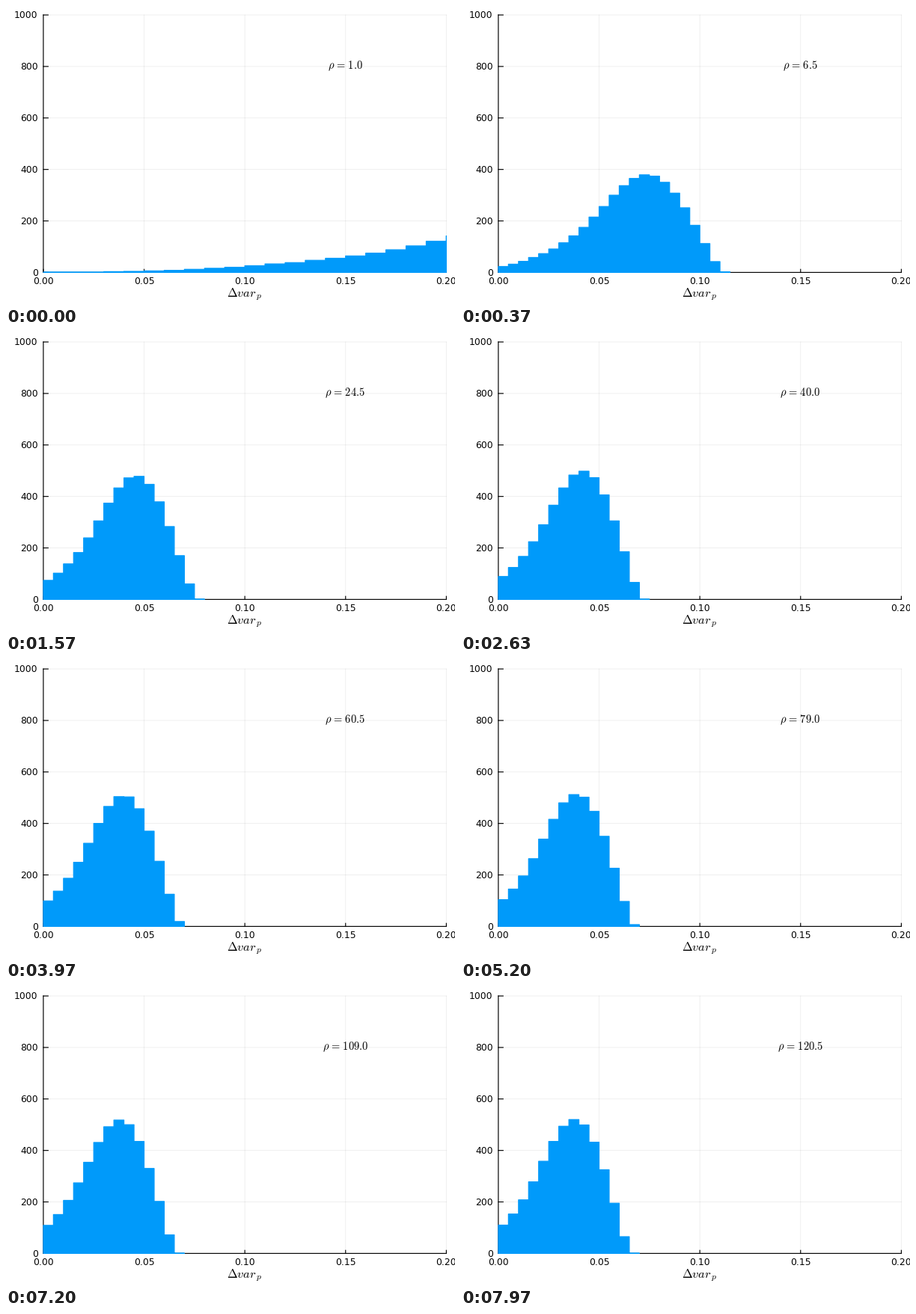
Recreate the animation shown at these times as a matplotlib script. Size 600x400 px, loop 8000 ms.

```python
import matplotlib.pyplot as plt
import numpy as np
from matplotlib.animation import FuncAnimation
from matplotlib.patches import Polygon

W, H, DPI = 600, 400, 100
FRAMES, LOOP = 240, 8000
X0, X1, Y0, Y1 = 49.9, 588.4, 356.4, 12.0
XMAX, YMAX = 0.2, 1000
N = 4265
BLUE = "#009AFA"

plt.rcParams["font.family"] = "DejaVu Sans"
plt.rcParams["mathtext.fontset"] = "cm"

# Weibull-like score: 0 at the largest sample, growing into the lower tail
Z = np.linspace(0, 3, 600)
ABOVE = 1 - np.exp(-Z ** (1 / 0.45))
BEND = 1 / (1 + np.exp(-5 * (Z - 1.5)))


def pt(pixels):
    return pixels * 72 / DPI


def px(x):
    return X0 + (X1 - X0) * np.asarray(x) / XMAX


def py(y):
    return Y0 + (Y1 - Y0) * np.asarray(y) / YMAX


def quantiles(rho):
    """Values from largest to smallest; each one is linear in 1 / rho."""
    u = 1 / rho
    top = 0.0631 + 0.3147 * u
    spread = 0.0363 + 0.0928 * u
    tail = 0.0055 + 0.035 * u
    return top - spread * Z - tail * BEND


def bin_width(vals):
    """Freedman-Diaconis width, rounded to a neat step."""
    q3, q1 = np.interp([0.25, 0.75], ABOVE, vals)
    return 0.01 if 2 * (q3 - q1) / N ** (1 / 3) > 0.0055 else 0.005


def outline(rho):
    vals = quantiles(rho)
    step = bin_width(vals)
    edges = step * np.arange(round(XMAX / step) + 2)
    above = np.round(N * np.interp(edges, vals[::-1], ABOVE[::-1]))
    counts = -np.diff(above)
    used = np.flatnonzero(counts)
    a, b = used[0], used[-1] + 1
    xs = np.repeat(np.minimum(edges[a:b + 1], XMAX), 2)
    ys = np.concatenate([[0], np.repeat(counts[a:b], 2), [0]])
    return np.column_stack([px(xs), py(ys)])


fig = plt.figure(figsize=(W / DPI, H / DPI), dpi=DPI, facecolor="white")
ax = fig.add_axes([0, 0, 1, 1])
ax.set_xlim(0, W)
ax.set_ylim(H, 0)
ax.axis("off")


def line(xs, ys, width=1.15, **style):
    ax.plot(xs, ys, color="black", lw=pt(width), snap=False, **style)


def label(x, y, text, size, ha="center"):
    return ax.text(x, y, text, fontsize=pt(size), ha=ha, va="baseline")


for x in np.linspace(0, XMAX, 5):
    gx = px(x)
    line([gx, gx], [Y0, Y1], 0.9, alpha=0.07, zorder=1)
    line([gx, gx], [Y0, Y0 - 4.1], zorder=2)
    label(gx, 372, f"{x:.2f}", 12.4)
for y in range(0, YMAX + 1, 200):
    gy = py(y)
    line([X0, X1], [gy, gy], 0.9, alpha=0.07, zorder=1)
    line([X0, X0 + 6.4], [gy, gy], zorder=2)
    label(42.6, gy + 4.5, str(y), 12.4, "right")
line([X0, X0, X1], [Y1, Y0, Y0], zorder=2)
label(318.3, 389, r"$\Delta var_{\,p}$", 16.5)

bars = ax.add_patch(Polygon([(X0, Y0)] * 3, fc=BLUE, ec=BLUE, lw=pt(1.2),
                            joinstyle="round", snap=False, zorder=3))
note = label(453.4, 84.6, "", 14.5)


def draw(i):
    rho = 1 + i / 2
    bars.set_xy(outline(rho))
    note.set_text(rf"$\rho\hspace{{0.12}}=\hspace{{0.12}}{rho:.1f}$")
    return bars, note


anim = FuncAnimation(fig, draw, frames=FRAMES, interval=LOOP / FRAMES,
                     repeat=True, repeat_delay=0)
plt.show()
```
